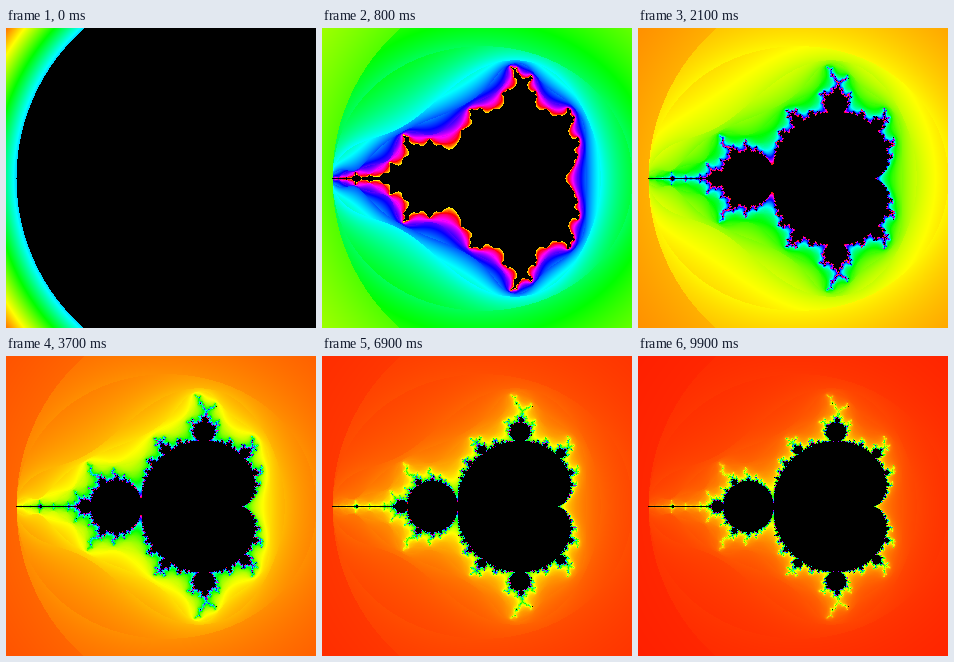
An HTML page with a canvas for the animation above (10 s loop, 310 by 300 pixels).

```html
<!DOCTYPE html>
<html lang="en">
<head>
<meta charset="utf-8">
<title>Mandelbrot set by iteration limit</title>
<style>
  html, body { margin: 0; width: 100%; height: 100%; overflow: hidden; background: #000; }
  canvas { display: block; }
</style>
</head>
<body>
<canvas id="stage" width="310" height="300"></canvas>
<script>
const W = 310, H = 300, STEPS = 100, STEP_MS = 100;
const ctx = document.getElementById('stage').getContext('2d');
const image = ctx.createImageData(W, H);
const steps = new Uint8Array(W * H);      // iterations until escape
const smooth = new Float64Array(W * H);   // fractional escape count

function escape(cx, cy, i) {
  let x = 0, y = 0;
  for (let n = 1; n <= STEPS; n++) {
    [x, y] = [x * x - y * y + cx, 2 * x * y + cy];
    const r2 = x * x + y * y;
    if (r2 > 4) {
      steps[i] = n;
      smooth[i] = n + 1 - Math.log2(Math.log(r2) / 2);
      return;
    }
  }
  steps[i] = STEPS + 1;
}

for (let i = 0; i < W * H; i++) {
  escape((i % W - 210) / 100, (Math.floor(i / W) - 150) / 100, i);
}

// Colour every point that escapes within the limit; the rest stays black.
function draw(limit) {
  const px = image.data;
  for (let i = 0, p = 0; i < W * H; i++, p += 4) {
    let r = 0, g = 0, b = 0;
    if (steps[i] <= limit) {
      const h = (((smooth[i] / limit) % 1 + 1) % 1) * 6;
      r = Math.abs(h - 3) - 1;
      g = 2 - Math.abs(h - 2);
      b = 2 - Math.abs(h - 4);
    }
    px[p] = r * 255;
    px[p + 1] = g * 255;
    px[p + 2] = b * 255;
    px[p + 3] = 255;
  }
  ctx.putImageData(image, 0, 0);
}

let shown = 0;
function tick() {
  const limit = Math.floor(performance.now() / STEP_MS) % STEPS + 1;
  if (limit !== shown) draw(shown = limit);
  requestAnimationFrame(tick);
}
tick();
</script>
</body>
</html>
```
